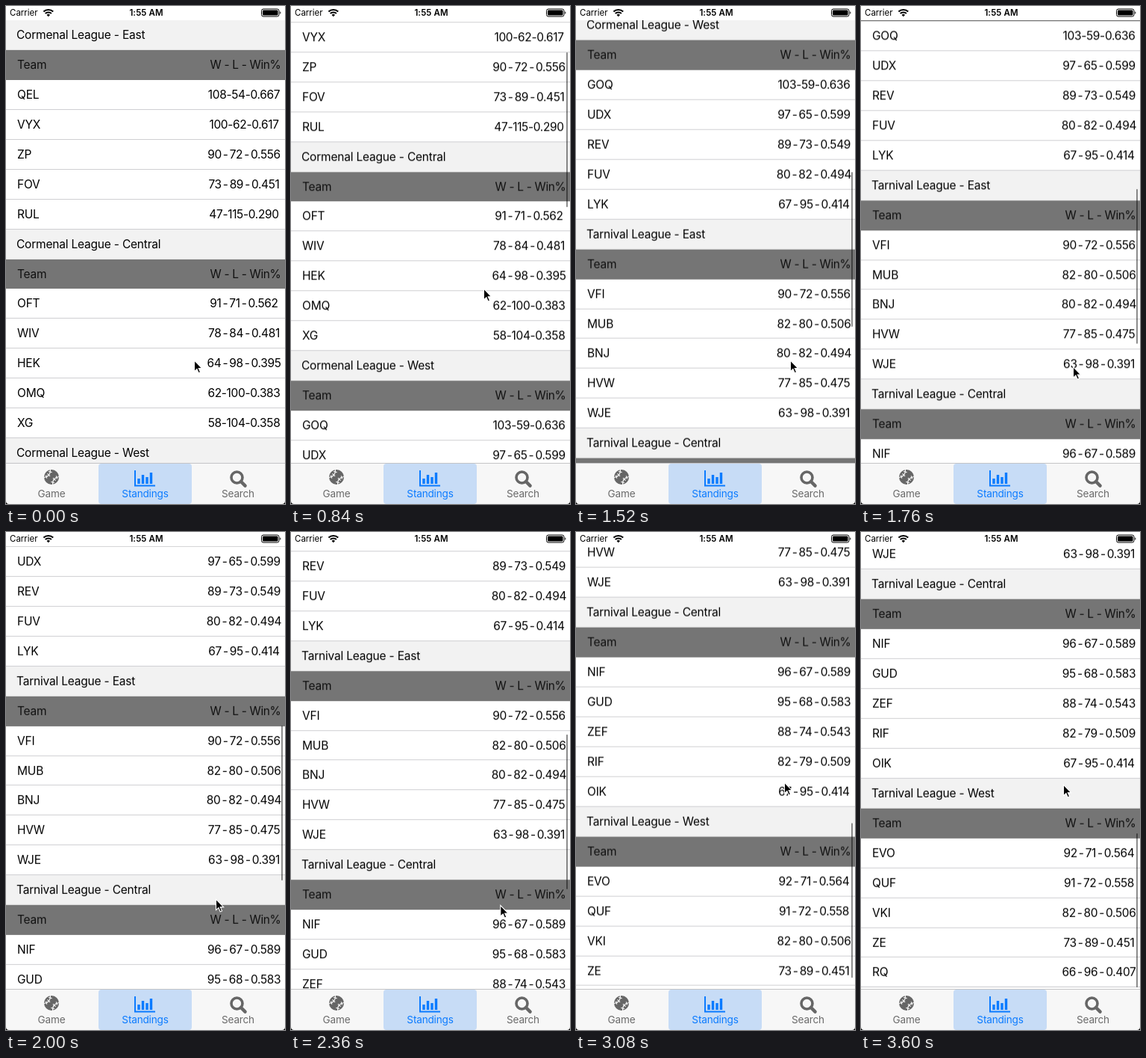
These frames come from a looping animation (374x666 px, 3.64 s). An HTML page:

```html
<!DOCTYPE html>
<html lang="en">
<head>
<meta charset="utf-8">
<title>Standings</title>
<style>
  html, body { margin: 0; width: 100%; height: 100%; overflow: hidden; background: #fff; }
  body { position: relative; font: 15.5px Inter, sans-serif; letter-spacing: -.2px; color: #000; }
  body > *, svg { position: absolute; }
  #view { left: 0; top: 19px; width: 374px; height: 592px; overflow: hidden; }
  #list { position: absolute; width: 100%; will-change: transform; }
  .row { position: relative; box-sizing: border-box; height: 39.94px; line-height: 39.5px; padding-left: 15px;
         border-bottom: 1px solid #cfcfd2; white-space: nowrap; }
  .title { background: #f2f2f2; padding-left: 14px; border-color: #e2e2e2; }
  .head { background: #757575; border-color: #757575; color: #111; }
  .row span { position: absolute; left: 319px; transform: translateX(-50%); letter-spacing: -.35px; }
  .head span { left: 321px; }
  .row i { font-style: normal; }
  .short i { margin: 0 2px; }
  #bar { left: 368.5px; top: 0; width: 2.5px; border-radius: 2px; background: rgba(0, 0, 0, .45); }
  #status { left: 0; top: 0; width: 374px; height: 19px; background: #fff; font-size: 11.5px; line-height: 18.5px; }
  #status span { position: absolute; left: 5px; letter-spacing: 0; }
  #status b { position: absolute; width: 100%; left: 1px; text-align: center; font-weight: 600; letter-spacing: .1px; }
  #tabs { left: 0; top: 611px; width: 374px; height: 55px; box-sizing: border-box; background: #f7f7f7;
          border-top: 1px solid #c4c4c6; color: #6b6b6b; font-size: 13.6px; }
  #tabs div { position: absolute; top: 0; width: 125px; height: 54px; line-height: 80px; text-align: center; border-radius: 4px; }
  #tabs .on { background: #c7dcf6; color: #0b7bff; }
  #icons, #pointer { left: 0; top: 0; }
</style>
</head>
<body>
<div id="view"><div id="list"></div></div>
<div id="bar"></div>
<div id="status"><span>Carrier</span><b>1:55 AM</b></div>
<div id="tabs">
  <div style="left:-1.5px">Game</div>
  <div class="on" style="left:124px">Standings</div>
  <div style="left:248.5px">Search</div>
</div>
<svg id="icons" width="374" height="666" fill="none">
  <g stroke="#000" stroke-width="2.1">
    <path d="M50.4 7.6a9.2 9.2 0 0 1 12.8 0M52.7 10.1a5.9 5.9 0 0 1 8.2 0"/>
    <path d="M54.6 11.9a3.2 3.2 0 0 1 4.4 0L56.8 14.2z" fill="#000" stroke="none"/>
  </g>
  <rect x="342.5" y="4" width="23.5" height="10" rx="2.5" stroke="#000"/>
  <rect x="344" y="5.5" width="20.5" height="7" rx="1.2" fill="#000"/>
  <path d="M367.3 7.2a2 2 0 0 1 0 3.6z" fill="#000"/>
  <circle cx="61" cy="630" r="10" fill="#666"/>
  <g stroke="#f7f7f7" stroke-width="1.2">
    <path d="M59.5 620Q60 629 51 630.5M62.5 640Q62 631 71 629.5"/>
    <path d="M57 622.5l4.6 1.2M55.4 625.3l3.6 3.6M53.5 627.5l1.2 4.2M65 637.5l-4.6-1.2M66.6 634.7l-3.6-3.6M68.5 632.5l-1.2-4.2"/>
  </g>
  <path d="M173 621v20.5h27" stroke="#0b7bff" stroke-width="2"/>
  <path d="M178 639v-7M183.5 639v-12M189 639v-9M194.5 639v-15" stroke="#0b7bff" stroke-width="3.4"/>
  <g stroke="#666">
    <circle cx="309.5" cy="630.5" r="7.5" stroke-width="3.6"/>
    <path d="M315 636l5.6 5.6" stroke-width="4.4" stroke-linecap="round"/>
  </g>
  <path d="M0 662v4h4a4 4 0 0 1-4-4zM374 662v4h-4a4 4 0 0 0 4-4z" fill="#000"/>
</svg>
<svg id="pointer" width="16" height="22" overflow="visible">
  <path d="M.5 0V14.6L3.9 11.5 6.2 16.8 8.6 15.8 6.3 10.6H10.7z" fill="#000" stroke="#fff" stroke-width="1.1"/>
</svg>
<script>
const LOOP = 3640, END = 1086.5;
const $ = id => document.getElementById(id);

const divisions = [
  ['Cormenal League - East', 'QEL 108 54', 'VYX 100 62', 'ZP 90 72', 'FOV 73 89', 'RUL 47 115'],
  ['Cormenal League - Central', 'OFT 91 71', 'WIV 78 84', 'HEK 64 98', 'OMQ 62 100', 'XG 58 104'],
  ['Cormenal League - West', 'GOQ 103 59', 'UDX 97 65', 'REV 89 73', 'FUV 80 82', 'LYK 67 95'],
  ['Tarnival League - East', 'VFI 90 72', 'MUB 82 80', 'BNJ 80 82', 'HVW 77 85', 'WJE 63 98'],
  ['Tarnival League - Central', 'NIF 96 67', 'GUD 95 68', 'ZEF 88 74', 'RIF 82 79', 'OIK 67 95'],
  ['Tarnival League - West', 'EVO 92 71', 'QUF 91 72', 'VKI 82 80', 'ZE 73 89', 'RQ 66 96'],
];

function teamRow(entry) {
  const [team, won, lost] = entry.split(' ');
  const rate = (won / (+won + +lost)).toFixed(3);
  const size = (won + lost).length < 5 ? 'short' : '';
  return `<div class="row ${size}">${team}<span>${[won, lost, rate].join('<i>-</i>')}</span></div>`;
}

$('list').innerHTML = divisions.map(([name, ...teams]) =>
  `<div class="row title">${name}</div>
   <div class="row head">Team<span>W - L - Win%</span></div>` + teams.map(teamRow).join('')).join('');

// Two flicks: each is a drag followed by exponential coasting; the second bounces at the end.
const coast = (t, from, rest, left) => rest - left * Math.exp((from - t) / 500);

function scrollAt(t) {
  if (t < 660) return 0;
  if (t < 950) return 116 * ((t - 660) / 180) ** 1.2;
  if (t < 2520) return coast(t, 1520, 743.8, 171.8);
  if (t < 2720) return 720.6 + 150.4 * (t - 2520) / 200;
  if (t < 3205) return coast(t, 2720, 1218, 347);
  const s = t - 3205;
  return END + .263 * s * Math.exp(-s / 80);
}

// time, x, y
const pointerPath = [
  [0, 252, 474], [120, 252, 474], [400, 278, 495], [660, 278, 495], [840, 258, 379], [950, 255, 290],
  [1130, 258, 300], [1520, 287, 474], [2000, 281, 491], [2520, 280, 503], [2720, 271, 353],
  [2760, 272, 338], [3080, 279, 335], [3600, 271, 338], [LOOP, 271, 338],
];

function pointerAt(t) {
  const i = pointerPath.findIndex(p => p[0] > t);
  const [t0, x0, y0] = pointerPath[i - 1], [t1, x1, y1] = pointerPath[i];
  const k = (t - t0) / (t1 - t0);
  return [x0 + (x1 - x0) * k, y0 + (y1 - y0) * k];
}

function draw(now) {
  const t = now % LOOP, y = scrollAt(t), [px, py] = pointerAt(t);
  $('list').style.transform = `translateY(${-y}px)`;
  $('pointer').style.transform = `translate(${px}px, ${py}px)`;
  const bar = $('bar').style, over = Math.max(0, y - END);
  bar.visibility = t < 680 ? 'hidden' : 'visible';
  bar.height = 207 - over + 'px';
  bar.transform = `translateY(${21 + .351 * (y - over) + over}px)`;
}

const start = performance.now();
(function tick() {
  draw(performance.now() - start);
  requestAnimationFrame(tick);
})();
</script>
</body>
</html>
```
